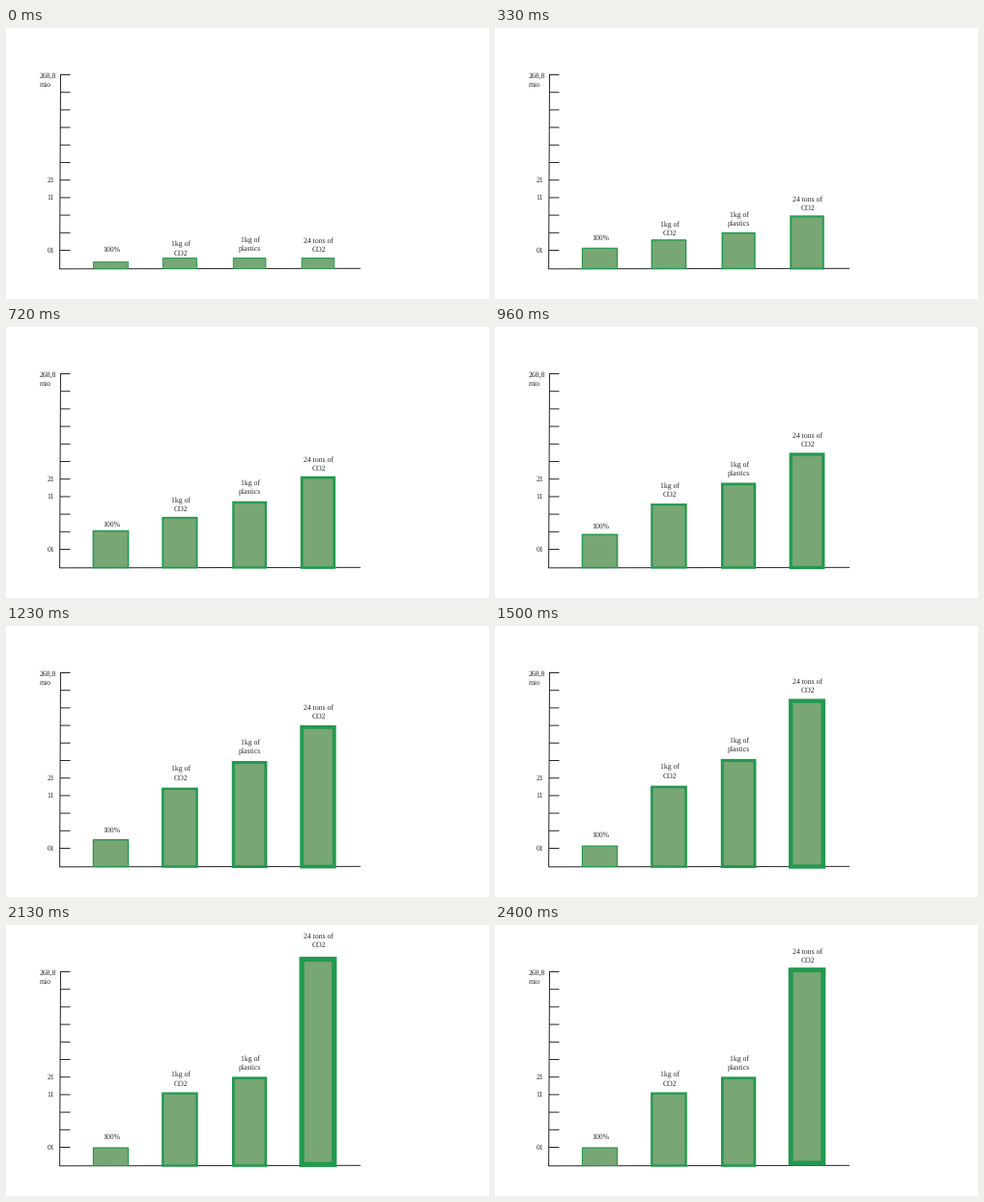
A matplotlib script that plays this animation: 500x281 px, repeating every 4080 ms.

```python
import numpy as np
import matplotlib.pyplot as plt
from matplotlib.animation import FuncAnimation
from matplotlib.patches import Rectangle

WIDTH, HEIGHT, DPI = 500, 281, 64
PX = 72 / DPI  # points per pixel
STEP, LOOP = 30, 4080
INK, EDGE, FILL = "#262626", "#22994f", "#78a675"
FONT_SIZE, LINE_GAP = 7.7, 9
BASE = 249.5

plt.rcParams["text.hinting"] = "none"
fig = plt.figure(figsize=(WIDTH / DPI, HEIGHT / DPI), dpi=DPI, facecolor="white")
ax = fig.add_axes([0, 0, 1, 1])
ax.set(xlim=(0, WIDTH), ylim=(HEIGHT, 0))
ax.axis("off")


def line(x0, y0, x1, y1):
    ax.plot([x0, x1], [y0, y1], color=INK, lw=PX, snap=False,
            solid_capstyle="butt", zorder=1)


def label(x, y, text, ha="center"):
    """Text whose digits are centred on y."""
    return ax.text(x, y + 2.5, text, ha=ha, va="baseline", color=INK,
                   fontsize=FONT_SIZE * PX, family="Liberation Serif", zorder=3)


def tween(ms, keys):
    """Linear motion through (time, value) keys, holding the last value."""
    return np.interp(ms, *zip(*keys))


class Bar:
    """Bar that overshoots and settles, with a caption moving on its own."""

    def __init__(self, left, right, caption, top, text, bottom=((0, BASE),)):
        self.top, self.text, self.bottom = top, text, bottom
        self.patch = ax.add_patch(Rectangle((left, 0), right - left, 1, fc=FILL,
                                            ec=EDGE, snap=False, zorder=2))
        center = (left + right) / 2
        self.lines = [label(center + 0.7, 0, word) for word in caption.split("\n")]

    def update(self, ms):
        top, bottom = tween(ms, self.top), tween(ms, self.bottom)
        height = bottom - top
        self.patch.set(y=top, height=height)
        self.patch.set_linewidth((0.75 + 0.021 * height) * PX)  # thickens as it grows
        for i, item in enumerate(self.lines):
            item.set_y(tween(ms, self.text) + i * LINE_GAP + 2.5)


# Slightly tilted axes, evenly spaced ticks and the scale
line(56.5, 48, 55.6, 250)
line(55.5, 249.8, 367, 249.3)
for y in np.linspace(48.5, 230.5, 11):
    line(56, y, 66.5, y)
for x, y, text in ((35, 49, "268,8"), (35, 58, "mio"), (42.8, 157, "21"),
                   (42.8, 176, "11"), (42.8, 230, "01")):
    label(x, y, text, ha="left")

bars = [
    Bar(90.4, 126.6, "100%".center(1),
        top=[(0, 242.6), (750, 210.2), (1620, 231)],
        text=[(0, 229), (750, 203), (1620, 219)]),
    Bar(162.3, 197.6, "1kg of\nCO2",
        top=[(0, 238.6), (1350, 162), (1740, 174.6)],
        text=[(0, 224), (1350, 140.5), (1740, 155)]),
    Bar(235.3, 268.9, "1kg of\nplastics",
        top=[(0, 238.6), (1350, 132), (1890, 158.7)],
        text=[(0, 220), (1350, 111), (1890, 139)]),
    Bar(306.2, 339.8, "24 tons of\nCO2",
        top=[(0, 238.6), (330, 195.3), (1500, 77.7), (1900, 26), (2400, 46.6)],
        text=[(0, 220.5), (330, 177), (2010, 5), (2400, 27)],
        bottom=[(1900, BASE), (2400, 247)]),
]


def update(frame):
    for bar in bars:
        bar.update(frame * STEP)


anim = FuncAnimation(fig, update, init_func=lambda: update(0), frames=LOOP // STEP,
                     interval=STEP, repeat=True, repeat_delay=0, blit=False)
plt.show()
```
